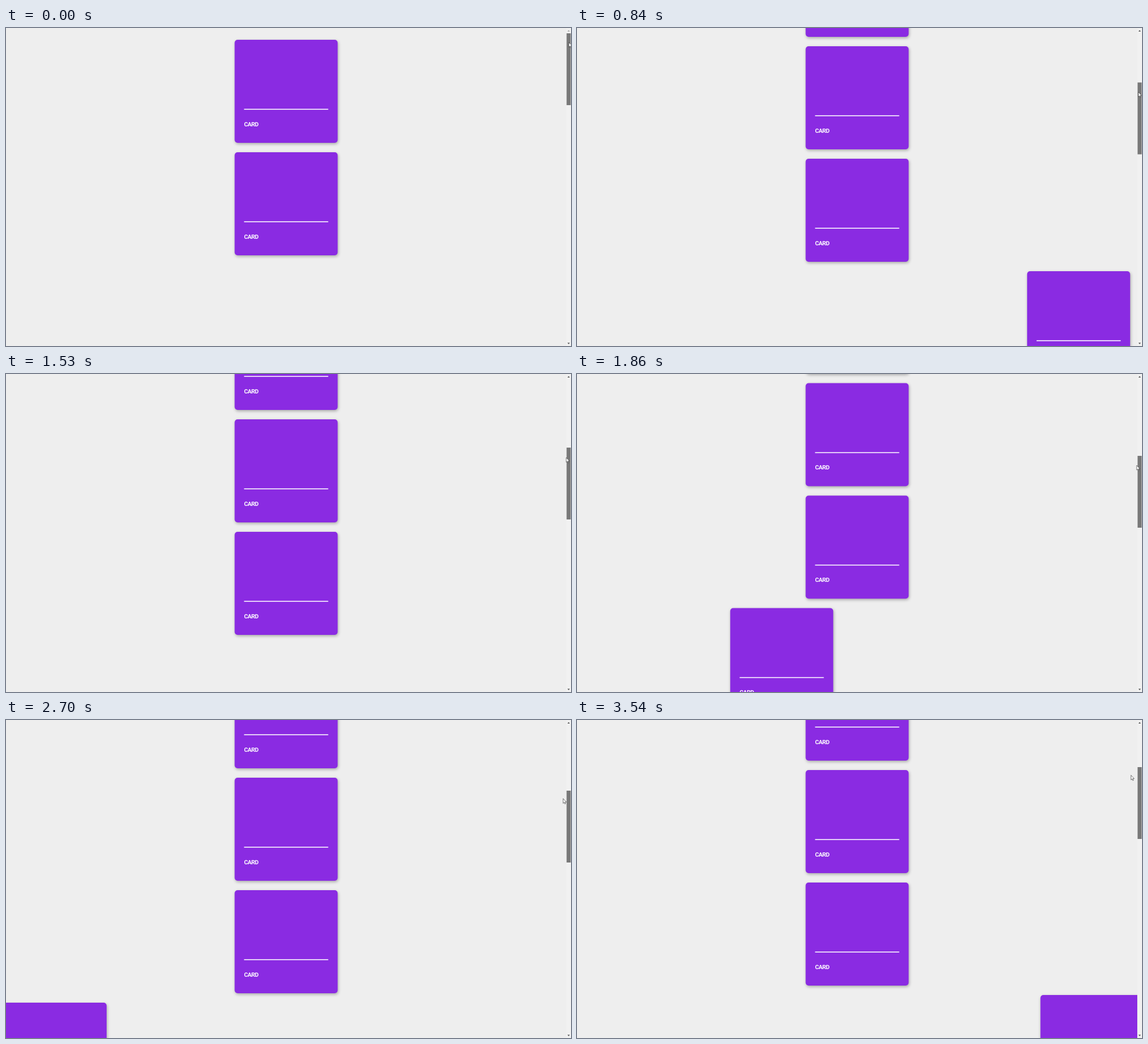
An HTML page that plays this animation: 960 by 540 pixels, repeating every 3.57 s.

```html
<!DOCTYPE html>
<html lang="en">
<head>
<meta charset="utf-8">
<title>Scroll cards</title>
<style>
  html, body { margin: 0; width: 100%; height: 100%; overflow: hidden; background: #eee; }
  svg { display: block; width: 960px; height: 540px; }
  .face { fill: #8a2be2; filter: drop-shadow(1px 2px 2.5px rgba(0, 0, 0, .3)); }
  .card text {
    font: bold 10px Roboto, sans-serif; letter-spacing: -.45px;
    fill: #fff; text-rendering: geometricPrecision;
  }
</style>
</head>
<body>
<svg viewBox="0 0 960 540">
  <defs>
    <g id="card" class="card">
      <rect class="face" width="175" height="175" rx="5"/>
      <rect x="16" y="117.25" width="143" height="1.5" fill="#fff"/>
      <text x="15.9" y="146.6">CARD</text>
    </g>
  </defs>
  <g id="cards"></g>
  <rect x="952" width="8" height="540" fill="#f1f1f1"/>
  <rect id="thumb" x="952.5" width="7" height="122" fill="#787878"/>
  <path id="up" d="M954 6 L956 3.6 L958 6 Z"/>
  <path d="M954 534.5 L956 537 L958 534.5 Z" fill="#505050"/>
  <path id="cursor" d="M.3 .4 V8.4 L2.1 6.8 L3.3 9.5 L4.5 9 L3.3 6.3 H5.8 Z"
    fill="#fff" stroke="#222" stroke-width=".6"/>
</svg>
<script>
const LOOP = 3570, STEP = 30, SLIDE = 400;
const LEFT = 388.5, TOP = 20, PITCH = 191, FAR = 700;
const TRIGGER = 540 * 4 / 5;

// Dragging the page: [time, scroll]
const drag = [[0, 0], [168, 161], [450, 292], [1200, 434], [1652, 543], [1860, 577.5],
  [2100, 604.5], [2460, 604.5], [2490, 577.5], [3030, 409.5], [3408, 352], [3600, 300]];

const $ = id => document.getElementById(id);
const clamp = x => Math.min(1, Math.max(0, x));

const slope = i => (drag[i + 1][1] - drag[i][1]) / (drag[i + 1][0] - drag[i][0]);

function tangent(i) {
  if (i === 0) return slope(0);
  if (i === drag.length - 1) return slope(i - 1);
  const a = slope(i - 1), b = slope(i);
  return a * b > 0 ? 2 * a * b / (a + b) : 0;
}

// Monotone cubic through the drag points
function scrollAt(t) {
  let i = 0;
  while (i < drag.length - 2 && t >= drag[i + 1][0]) i++;
  const [t0, s0] = drag[i], [t1, s1] = drag[i + 1];
  const w = t1 - t0, u = clamp((t - t0) / w), v = 1 - u;
  return s0 + (s1 - s0) * u * u * (3 - 2 * u)
    + w * u * v * (tangent(i) * v - tangent(i + 1) * u);
}

// CSS "ease": cubic-bezier(.25, .1, .25, 1)
function ease(x) {
  x = clamp(x);
  let lo = 0, hi = 1;
  for (let n = 0; n < 24; n++) {
    const u = (lo + hi) / 2;
    if (.75 * u * (1 - u) + u ** 3 < x) lo = u; else hi = u;
  }
  const v = 1 - lo;
  return .3 * v * v * lo + 3 * v * lo * lo + lo ** 3;
}

const cards = Array.from({ length: 12 }, (_, i) => {
  const el = document.createElementNS('http://www.w3.org/2000/svg', 'use');
  el.setAttribute('href', '#card');
  $('cards').append(el);
  return { el, top: TOP + PITCH * i, side: i % 2 ? -1 : 1, first: i < 2, flips: [] };
});

// A card slides in or out whenever its top crosses the trigger line
for (const c of cards) {
  let shown = c.first;
  for (let t = STEP; t < LOOP; t += 2) {
    if (c.top - scrollAt(t) < TRIGGER !== shown) {
      shown = !shown;
      c.flips.push({ t, dir: shown ? 1 : -1 });
    }
  }
}

function offset(c, t) {
  const here = c.flips.reduce((sum, f) => sum + f.dir * ease((t - f.t) / SLIDE), c.first ? 1 : 0);
  return c.side * FAR * (1 - here);
}

const half = x => Math.round(x * 2) / 2;
const thumbTop = s => 9 + s / 4.45;
const move = (el, x, y) => el.setAttribute('transform', `translate(${x.toFixed(2)} ${y.toFixed(2)})`);

function draw(t) {
  const s = half(scrollAt(t));
  for (const c of cards) move(c.el, LEFT + offset(c, t), c.top - s);
  move($('thumb'), 0, half(thumbTop(s)));
  $('up').setAttribute('fill', s > 0 ? '#505050' : '#a3a3a3');
  // The pointer runs one step ahead of the page it drags
  const lead = t ? scrollAt(t + STEP) : 0;
  const x = 956 - 6 * clamp(t / 2100) - 9 * clamp((t - 2460) / 1080) ** .6;
  move($('cursor'), x, thumbTop(lead) + 15);
}

const start = performance.now();
function tick() {
  const t = (performance.now() - start) % LOOP;
  draw(Math.floor(t / STEP) * STEP);
  requestAnimationFrame(tick);
}
draw(0);
requestAnimationFrame(tick);
</script>
</body>
</html>
```
